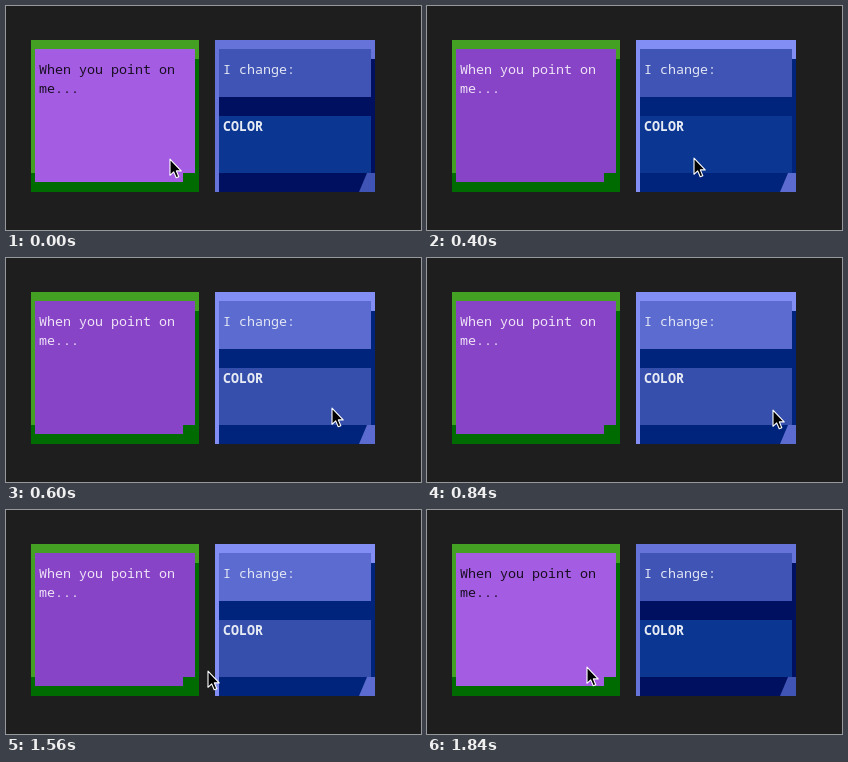
An HTML page for the animation above (2 s loop, 415 px wide and 224 px high).

```html
<!DOCTYPE html>
<html lang="en">
<head>
<meta charset="utf-8">
<title>Hover colors</title>
<style>
  html, body { margin: 0; width: 100%; height: 100%; overflow: hidden; background: #1e1e1e; }
  svg { display: block; width: 415px; height: 224px; }
  .cells { shape-rendering: crispEdges; }
  text { font: 13.333px "Noto Sans Mono", "DejaVu Sans Mono", monospace; fill: #e2e6f4; white-space: pre; }
  .bold { font-weight: 700; fill: #e7ebf4; }

  .note, .ink, .edge, .base, .head, .body, .grip, .pointer {
    animation: 2s step-end infinite;
  }
  .note { animation-name: note; }
  .ink { animation-name: ink; }
  .edge { animation-name: edge; }
  .base { animation-name: base; }
  .head { animation-name: head; }
  .body { animation-name: body; }
  .grip { animation-name: grip; }
  .pointer { animation-name: pointer; }

  @keyframes note {
    0%, 82% { fill: #a45de2; }
    18%, 80% { fill: #a05adf; }
    20% { fill: #8844c6; }
  }
  @keyframes ink {
    0%, 80% { fill: #170d20; }
    18% { fill: #eee3f7; }
  }
  @keyframes edge {
    0%, 80% { fill: #6674d9; }
    20% { fill: #828ef4; }
  }
  @keyframes base {
    0%, 80% { fill: #001060; }
    20% { fill: #00247c; }
  }
  @keyframes grip {
    0%, 80% { fill: #4054b5; }
    20% { fill: #5c6bd0; }
  }
  @keyframes head {
    0%, 82% { fill: #4054b5; }
    22% { fill: #5c6bd0; }
  }
  @keyframes body {
    0%, 82% { fill: #0b3691; }
    22% { fill: #364fac; }
  }
  @keyframes pointer {
    0% { transform: translate(163px, 152px); }
    14% { transform: translate(168px, 153px); }
    16% { transform: translate(190px, 154px); }
    18% { transform: translate(225px, 154px); }
    20% { transform: translate(266px, 151px); }
    22% { transform: translate(286px, 150px); }
    24% { transform: translate(301px, 149px); }
    26% { transform: translate(312px, 149px); }
    28% { transform: translate(319px, 149px); }
    30% { transform: translate(325px, 149px); }
    32% { transform: translate(335px, 150px); }
    34% { transform: translate(343px, 150px); }
    42% { transform: translate(345px, 151px); }
    66% { transform: translate(338px, 150px); }
    68% { transform: translate(325px, 151px); }
    70% { transform: translate(304px, 153px); }
    72% { transform: translate(279px, 155px); }
    74% { transform: translate(252px, 157px); }
    76% { transform: translate(225px, 159px); }
    78% { transform: translate(201px, 160px); }
    80% { transform: translate(185px, 160px); }
    82% { transform: translate(175px, 159px); }
    84% { transform: translate(168px, 158px); }
    86% { transform: translate(164px, 157px); }
    88% { transform: translate(161px, 157px); }
    90% { transform: translate(160px, 156px); }
    92%, 100% { transform: translate(159px, 156px); }
  }
</style>
</head>
<body>
<svg viewBox="0 0 415 224">
  <g class="cells">
    <path fill="#006b00" d="M25 34H193V186H25z"/>
    <path fill="#43a022" d="M25 34H193V53H189V167H25z"/>
    <path class="note" d="M29 43H189V167H177V176H29z"/>

    <path class="base" d="M209 34H369V186H209z"/>
    <path class="edge" d="M209 34H369V53H365V43H213V186H209z"/>
    <path class="head" d="M213 43H365V91H213z"/>
    <path class="body" d="M213 110H365V167H213z"/>
  </g>
  <path class="grip" d="M353 186L361 167H369V186z"/>

  <text class="ink" x="33" y="68">When you point on</text>
  <text class="ink" x="33" y="87">me...</text>
  <text x="217" y="68">I change:</text>
  <text class="bold" x="217" y="125">COLOR</text>

  <g class="pointer">
    <path fill="#000" stroke="#fff" stroke-width="1.1" stroke-linejoin="round"
      d="M1 1.2V17.3L4.7 13.9L7.2 19.8L9.8 18.7L7.3 12.9H12.2z"/>
  </g>
</svg>
</body>
</html>
```
